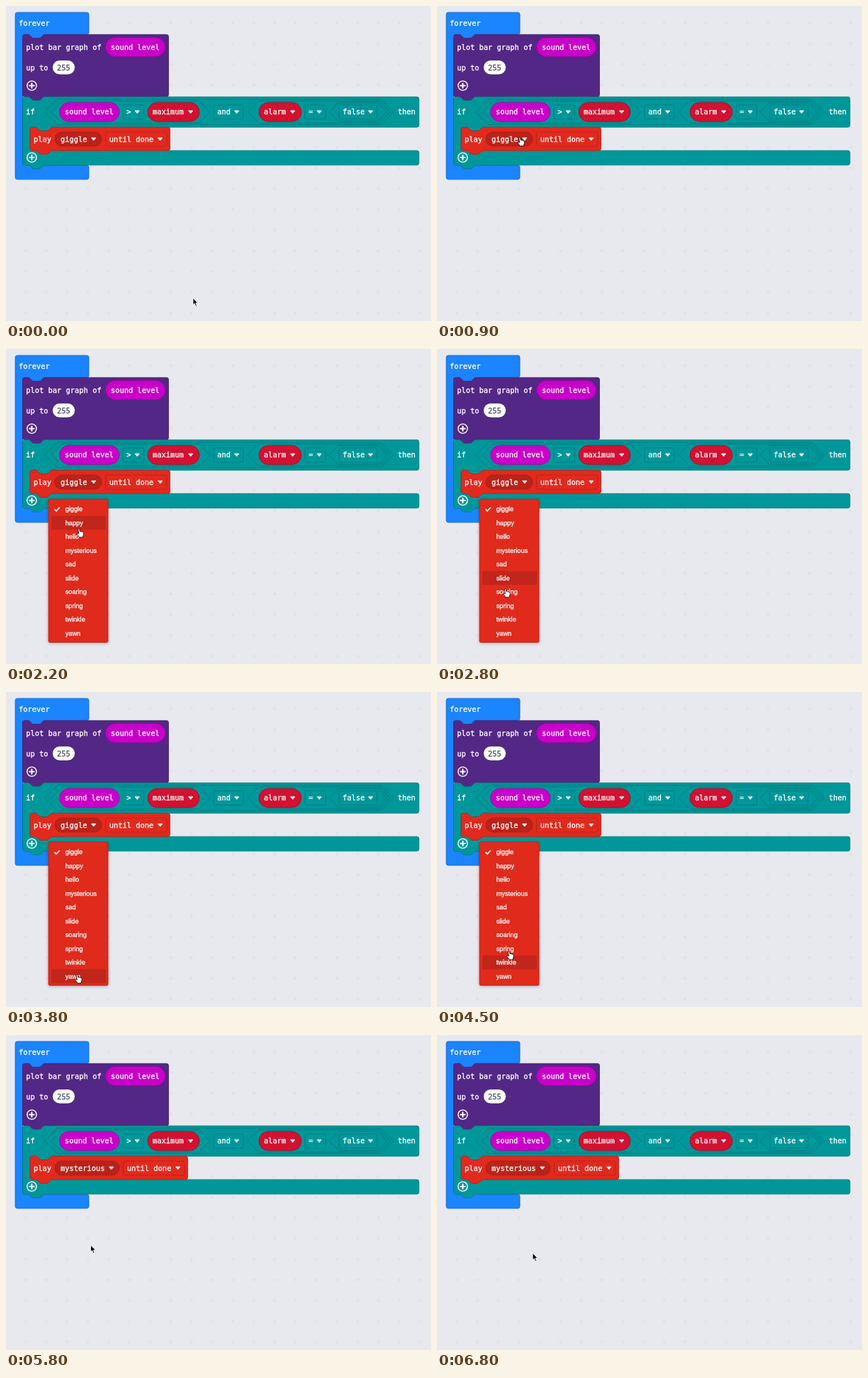
Animation of 600x445 px, one loop 6900 ms. Source, as an HTML page:

```html
<!DOCTYPE html>
<html lang="en">
<head>
<meta charset="utf-8">
<title>Block editor: choosing a sound</title>
<style>
  html, body { margin: 0; width: 100%; height: 100%; overflow: hidden; background: #e8e9ee; }
  svg { display: block; }
  text { fill: #fff; stroke: #fff; stroke-width: .3px; white-space: pre; }
  .code { font: 10.4px "DejaVu Sans Mono", monospace; }
  .menu { font: 9.2px "Liberation Sans", Arial, sans-serif; }
  .dark { fill: #4c5268; stroke: #4c5268; }
</style>
</head>
<body>
<svg id="stage" width="600" height="445" viewBox="0 0 600 445"></svg>
<script>
const LOOP = 6900, STEP = 100, CHAR = 6.26, PITCH = 19.5, MENU_TOP = 216.2;
const SOUNDS = ['giggle', 'happy', 'hello', 'mysterious', 'sad', 'slide', 'soaring', 'spring', 'twinkle', 'yawn'];

const BLUE = ['#1b84ff', '#1768c8'], PURPLE = ['#532785', '#412069'], TEAL = ['#00979a', '#00787b'],
      RED = ['#e2291d', '#b52118'], MAGENTA = ['#c900c9', '#8f0b94'], CRIMSON = ['#d31131', '#97102a'];

// Connector between stacked blocks, drawn rightwards and leftwards
const NOTCH = 'c1.3 0 2 .7 2.6 1.3l2.6 2.6c.7 .7 1.3 1.3 2.6 1.3h7.8c1.3 0 2 -.7 2.6 -1.3l2.6 -2.6c.7 -.7 1.3 -1.3 2.6 -1.3';
const BUMP = 'c-1.3 0 -2 .7 -2.6 1.3l-2.6 2.6c-.7 .7 -1.3 1.3 -2.6 1.3h-7.8c-1.3 0 -2 -.7 -2.6 -1.3l-2.6 -2.6c-.7 -.7 -1.3 -1.3 -2.6 -1.3';
const NOTCH_AT = 7.8, NOTCH_W = 23.4, ARM = 10.5;

const path = (d, [fill, stroke], width = .8) =>
  `<path d="${d}" fill="${fill}" stroke="${stroke}" stroke-width="${width}"/>`;
const rect = (x, y, w, h, r, [fill, stroke]) =>
  `<rect x="${x}" y="${y}" width="${w}" height="${h}" rx="${r}" fill="${fill}" stroke="${stroke}" stroke-width=".8"/>`;
const label = (x, y, s, cls = 'code') => `<text class="${cls}" x="${x}" y="${y + 3.5}">${s}</text>`;
const arrow = (x, y) => path(`M${x - 3} ${y - 1.7}h6l-3 3.6z`, ['#fff', '#fff'], 1);
const pill = (x, y, w, h, colors) => rect(x, y, w, h, h / 2, colors);

function block(x, y, w, h, colors, { notch = true, bump = true, mouth } = {}) {
  let d = `M${x + 3} ${y}`;
  if (notch) d += `H${x + NOTCH_AT}${NOTCH}`;
  d += `H${x + w - 3}q3 0 3 3`;
  if (mouth) {
    const [top, bottom] = mouth, inner = x + ARM;
    d += `V${top - 3}q0 3 -3 3H${inner + NOTCH_AT + NOTCH_W}${BUMP}H${inner + 2}q-2 0 -2 2` +
         `V${bottom - 2}q0 2 2 2H${x + w - 3}q3 0 3 3`;
  }
  d += `V${y + h - 3}q0 3 -3 3`;
  if (bump) d += `H${x + NOTCH_AT + NOTCH_W}${BUMP}`;
  return path(d + `H${x + 3}q-3 0 -3 -3V${y + 3}q0 -3 3 -3z`, colors);
}

function hexagon(left, right, half) {
  const y = 149.7;
  return path(`M${left} ${y}l${half} ${-half}H${right - half}l${half} ${half}l${-half} ${half}H${left + half}z`, TEAL);
}

// Outlined dropdown: box, caption and triangle
const dropdown = (x, y, w, s, colors) =>
  rect(x, y - 10, w, 20, 2.5, colors) + label(x + 5.3, y, s) + arrow(x + w - 9.3, y);
const variable = (x, w, s) => pill(x, 136.2, w, 27, CRIMSON) + label(x + 7, 149.7, s) + arrow(x + w - 12.3, 149.7);
const soundLevel = (x, y) => pill(x, y - 13.5, 84.5, 27, MAGENTA) + label(x + 7.5, y, 'sound level');
const plus = (x, y) =>
  `<path d="M${x - 4} ${y}h8M${x} ${y - 4}v8" stroke="#fff" stroke-width="2"/>` +
  `<circle cx="${x}" cy="${y}" r="6.6" fill="none" stroke="#fff" stroke-width="1.4"/>`;

const grid = `<defs>
  <pattern id="grid" x="13" y="9" width="29.3" height="29.3" patternUnits="userSpaceOnUse">
    <path d="M12.4 14.7h4.6M14.7 12.4v4.6" stroke="#bdc3c7" stroke-opacity=".3"/></pattern>
  <filter id="shadow" x="-20%" y="-10%" width="140%" height="120%">
    <feDropShadow dx="0" dy="1" stdDeviation="2" flood-opacity=".3"/></filter>
  </defs><rect width="600" height="445" fill="url(#grid)"/>`;

const foreverBlock = block(13, 9, 104, 236, BLUE, { notch: false, bump: false, mouth: [40.3, 225] }) +
  label(18, 24.5, 'forever');

const plotBlock = block(23.5, 40.3, 206, 88, PURPLE) + label(28.3, 58, 'plot bar graph of') +
  soundLevel(140.5, 58) + label(28.3, 87, 'up to') +
  pill(65.5, 76.5, 32, 20.5, ['#fff', '#412069']) + label(72, 87, '255', 'code dark') + plus(36.4, 112.5);

const ifBlock = block(23.5, 128.3, 559.5, 96.5, TEAL, { mouth: [171.2, 204.2] }) + label(28.3, 149.7, 'if') +
  hexagon(54.5, 547, 18) + hexagon(64, 288, 15.6) + soundLevel(75.5, 149.7) +
  dropdown(165, 149.7, 29.5, '&gt;', TEAL) + variable(200, 73, 'maximum') +
  dropdown(293, 149.7, 42, 'and', TEAL) + hexagon(341, 542.5, 15.6) + variable(357, 60, 'alarm') +
  dropdown(422, 149.7, 29.5, '=', TEAL) + hexagon(456, 538, 13.2) +
  dropdown(470, 149.7, 54, 'false', TEAL) + label(553, 149.7, 'then') + plus(36.4, 214);

// The sound field and everything right of it depend on the chosen word
function playBlock(sound) {
  const extra = (sound.length - 6) * CHAR;
  return block(34, 171.2, 197.5 + extra, 33, RED) + label(39, 188, 'play') +
    pill(69, 178, 66 + extra, 20, ['#b9231a', '#a51e16']) + label(77, 188, sound) + arrow(123.7 + extra, 188) +
    dropdown(140.5 + extra, 188, 86.5, 'until done', RED);
}

const menu = `<g id="menu"><rect x="60" y="212" width="84" height="202.5" rx="2" fill="#e0291d" stroke="#b52118"
  stroke-width=".8" filter="url(#shadow)"/><rect id="hover" x="64" width="77" height="19.5" fill="#c2251b"/>` +
  '<path d="M68.5 226.4l2.5 2.5 4.8 -5.2" fill="none" stroke="#fff" stroke-width="1.6"/>' +
  SOUNDS.map((s, i) => label(83.7, 225.8 + i * PITCH, s, 'menu')).join('') + '</g>';

const pointer = '<g id="pointer"><g id="arrow">' +
  path('M0 0V9.8l2.2 -2 1.7 3.9 1.7 -.7 -1.7 -3.8h3.1z', ['#000', '#fff'], .9) + '</g><g id="hand">' +
  path('M-1.2 .8c0 -1.5 2 -1.5 2.2 0l.4 3c.4 -.8 1.6 -.6 1.8 .2c.5 -.6 1.6 -.4 1.8 .4c.6 -.4 1.6 0 1.6 1v2.2' +
       'c0 1.6 -1 2.4 -1.2 4.2h-5c-.6 -1.8 -2.4 -3 -3 -4.6c-.3 -1 .8 -1.6 1.6 -.8l.8 .8z', ['#fff', '#000'], .8) +
  '</g></g>';

const $ = id => document.getElementById(id);
$('stage').innerHTML = grid + foreverBlock + plotBlock + ifBlock + '<g id="play"></g>' + menu + pointer;

// Pointer route: time, x, y
const ROUTE = [[0, 264, 412.5], [100, 264, 412.5], [800, 116.8, 186], [1600, 116.8, 186], [2100, 104, 240],
  [2800, 96.5, 339], [3500, 100.5, 399.5], [4250, 100.5, 399.5], [4950, 104, 285.5], [5500, 104, 285.5],
  [6100, 135, 308], [LOOP, 135, 308]];
const clamp = (v, lo, hi) => Math.min(hi, Math.max(lo, v));

function pointerAt(t) {
  const i = ROUTE.findIndex(p => p[0] > t);
  const [t0, x0, y0] = ROUTE[i - 1], [t1, x1, y1] = ROUTE[i];
  const k = (t - t0) / (t1 - t0);
  const e = t >= 1600 && t < 3500 ? k : k * k * (3 - 2 * k);
  return [x0 + (x1 - x0) * e, y0 + (y1 - y0) * e];
}

let shown;
function draw(t) {
  const [x, y] = pointerAt(t);
  $('pointer').setAttribute('transform', `translate(${x} ${y})`);
  const hand = t >= 700 && t < 5200;
  $('hand').style.display = hand ? '' : 'none';
  $('arrow').style.display = hand ? 'none' : '';

  $('menu').style.opacity = clamp((t - 1150) / 200, 0, 1) * clamp((5600 - t) / 200, 0, 1);
  // The highlight trails the pointer slightly
  const row = clamp(Math.floor((pointerAt(Math.max(0, t - 100))[1] - MENU_TOP) / PITCH), 0, SOUNDS.length - 1);
  $('hover').setAttribute('y', MENU_TOP + row * PITCH);

  const sound = SOUNDS[t < 5400 ? 0 : 3];
  if (sound !== shown) $('play').innerHTML = playBlock(shown = sound);
}

const start = performance.now();
function tick() {
  draw(Math.floor((performance.now() - start) % LOOP / STEP) * STEP);
  requestAnimationFrame(tick);
}
tick();
</script>
</body>
</html>
```
